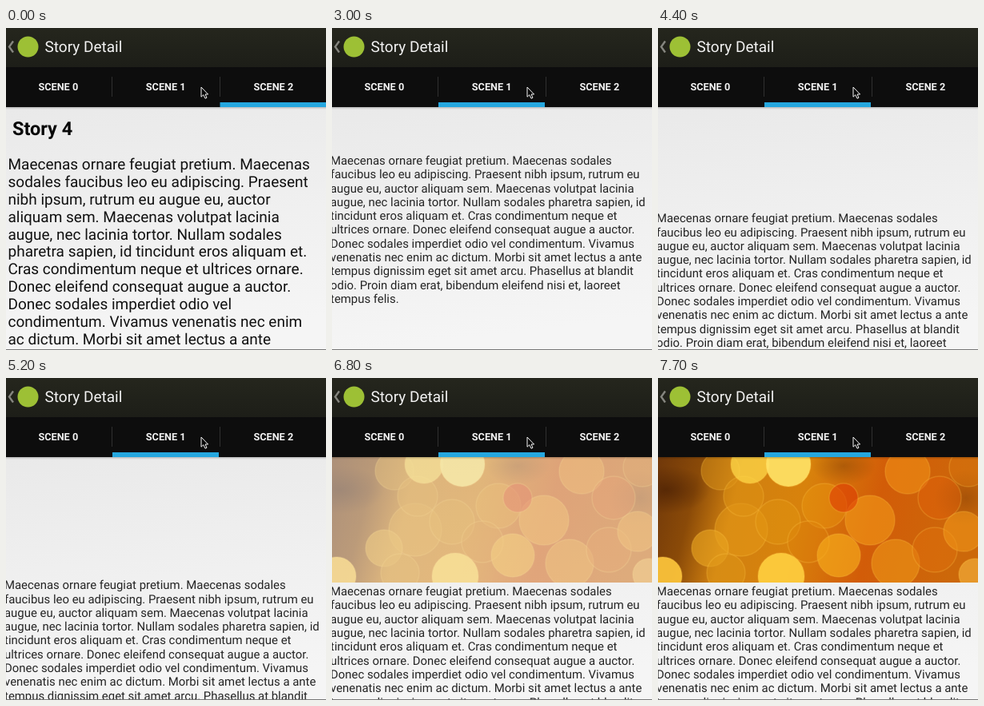
An HTML page that plays this animation: 400 by 403 pixels, repeating every 9700 ms.

```html
<!DOCTYPE html>
<html lang="en">
<head>
<meta charset="utf-8">
<title>Story Detail</title>
<style>
html, body { margin: 0; width: 100%; height: 100%; overflow: hidden; background: #eee; }
svg { display: block; width: 400px; height: 403px; font-family: Roboto, "Noto Sans", sans-serif; }
text { text-rendering: geometricPrecision; white-space: pre; }
.tab { font-size: 12.7px; font-weight: 700; fill: #f2f2f2; text-anchor: middle; }
</style>
</head>
<body>
<svg viewBox="0 0 400 403">
  <defs>
    <linearGradient id="paper" x1="0" y1="0" x2=".12" y2="1">
      <stop offset="0" stop-color="#e2e2e2"/>
      <stop offset=".16" stop-color="#e8e8e8"/>
      <stop offset=".6" stop-color="#efefef"/>
      <stop offset="1" stop-color="#f5f5f5"/>
    </linearGradient>
    <linearGradient id="bar" x1="0" y1="0" x2="0" y2="1">
      <stop offset="0" stop-color="#25261d"/>
      <stop offset="1" stop-color="#1d1e18"/>
    </linearGradient>
    <linearGradient id="shade" x1="0" y1="0" x2="0" y2="1">
      <stop offset="0" stop-color="#000" stop-opacity=".2"/>
      <stop offset="1" stop-color="#000" stop-opacity="0"/>
    </linearGradient>
    <linearGradient id="amber" x1="0" y1="0" x2="1" y2=".1">
      <stop offset="0" stop-color="#70380a"/>
      <stop offset=".14" stop-color="#8a4a08"/>
      <stop offset=".27" stop-color="#d08010"/>
      <stop offset=".48" stop-color="#d8820c"/>
      <stop offset=".72" stop-color="#d25c08"/>
      <stop offset="1" stop-color="#cc680a"/>
    </linearGradient>
    <radialGradient id="dark">
      <stop offset="0" stop-color="#4a2004" stop-opacity=".7"/>
      <stop offset="1" stop-color="#4a2004" stop-opacity="0"/>
    </radialGradient>
    <clipPath id="frame"><rect y="98" width="400" height="158"/></clipPath>
  </defs>

  <rect width="400" height="403" fill="url(#paper)"/>
  <g id="photo" clip-path="url(#frame)">
    <rect y="98" width="400" height="158" fill="url(#amber)"/>
    <ellipse cx="10" cy="140" rx="55" ry="30" fill="url(#dark)"/>
    <ellipse cx="232" cy="110" rx="40" ry="24" fill="url(#dark)" opacity=".4"/>
    <ellipse cx="385" cy="150" rx="40" ry="35" fill="url(#dark)" opacity=".4"/>
  </g>

  <text id="heading" x="8" y="134" font-size="23.5" font-weight="700" fill="#080808">Story 4</text>
  <g id="large" font-size="19" fill="#111"></g>
  <g id="small" font-size="14.92" fill="#242424"></g>
  <rect y="402" width="400" height="1" fill="#777"/>

  <rect y="99" width="400" height="3" fill="url(#shade)"/>
  <rect width="400" height="49" fill="url(#bar)"/>
  <rect y="49" width="400" height="50" fill="#0d0d0d"/>
  <path d="M9 16.5 4 23.5 9 30.5" fill="none" stroke="#85857f" stroke-width="2.4"/>
  <circle cx="27.5" cy="23.5" r="13" fill="#9dc035"/>
  <text x="48.5" y="30" font-size="19" fill="#f2f2f2">Story Detail</text>
  <path d="M132.5 61V86M267.5 61V86" stroke="#303030"/>
  <text class="tab" x="65.3" y="78.3">SCENE 0</text>
  <text class="tab" x="199.7" y="78.3">SCENE 1</text>
  <text class="tab" x="334.3" y="78.3">SCENE 2</text>
  <rect id="marker" y="93" width="133" height="6" fill="#25a7df"/>
  <path d="M244 74V86.2L246.8 83.7 249 88.2 251 87.2 249 83H252.6Z" fill="#080808" stroke="#f4f4f4"/>
</svg>
<script>
const LOOP = 9700, STEP = 100, SWITCH = 1000;
const $ = id => document.getElementById(id);

function add(parent, tag, attrs, text) {
  const el = document.createElementNS("http://www.w3.org/2000/svg", tag);
  for (const key in attrs) el.setAttribute(key, attrs[key]);
  if (text) el.textContent = text;
  parent.append(el);
}

function addLines(group, x, y, leading, lines) {
  lines.forEach((line, i) => add(group, "text", { x, y: y + i * leading }, line));
}

addLines($("large"), 2.5, 176.7, 21.95, [
  "Maecenas ornare feugiat pretium. Maecenas",
  "sodales faucibus leo eu adipiscing. Praesent",
  "nibh ipsum, rutrum eu augue eu, auctor",
  "aliquam sem. Maecenas volutpat lacinia",
  "augue, nec lacinia tortor. Nullam sodales",
  "pharetra sapien, id tincidunt eros aliquam et.",
  "Cras condimentum neque et ultrices ornare.",
  "Donec eleifend consequat augue a auctor.",
  "Donec sodales imperdiet odio vel",
  "condimentum. Vivamus venenatis nec enim",
  "ac dictum. Morbi sit amet lectus a ante"
]);
addLines($("small"), -2, 166, 17.32, [
  "Maecenas ornare feugiat pretium. Maecenas sodales",
  "faucibus leo eu adipiscing. Praesent nibh ipsum, rutrum eu",
  "augue eu, auctor aliquam sem. Maecenas volutpat lacinia",
  "augue, nec lacinia tortor. Nullam sodales pharetra sapien, id",
  "tincidunt eros aliquam et. Cras condimentum neque et",
  "ultrices ornare. Donec eleifend consequat augue a auctor.",
  "Donec sodales imperdiet odio vel condimentum. Vivamus",
  "venenatis nec enim ac dictum. Morbi sit amet lectus a ante",
  "tempus dignissim eget sit amet arcu. Phasellus at blandit",
  "odio. Proin diam erat, bibendum eleifend nisi et, laoreet",
  "tempus felis."
]);

// Bokeh lights: x, y, radius, colour, opacity
const lights = [
  [78, 116, 24, "#d89018", .55], [104, 190, 33, "#e89c18", .5],
  [107, 148, 25, "#e09414", .5], [65, 213, 23, "#e8a420", .65],
  [85, 244, 24, "#e09818", .5], [150, 180, 28, "#e09410", .45],
  [208, 160, 28, "#e8940e", .45], [188, 205, 26, "#dc800c", .4],
  [265, 178, 31, "#f49a18", .6], [312, 117, 28, "#ee8c14", .65],
  [352, 150, 27, "#e0600a", .5], [232, 150, 18, "#e03c04", .6],
  [226, 222, 27, "#f8ac1c", .65], [297, 232, 30, "#f09c18", .55],
  [346, 215, 28, "#e0700c", .5], [382, 192, 25, "#f09418", .6],
  [388, 112, 24, "#d8740e", .5], [396, 246, 20, "#f8b840", .6],
  [115, 108, 24, "#ffd848", .75], [163, 108, 28, "#ffe468", .9],
  [154, 248, 29, "#ffd040", .9], [6, 248, 24, "#ffc83c", .9]
];
for (const [cx, cy, r, color, alpha] of lights)
  add($("photo"), "circle", { cx, cy, r, fill: color, "fill-opacity": alpha,
    stroke: "#ffc648", "stroke-opacity": .25, "stroke-width": 1.5 });

const part = (t, from, length) => Math.min(1, Math.max(0, (t - from) / length));
const smooth = p => (1 - Math.cos(Math.PI * p)) / 2;

function bounce(p) {
  const x = p * 1.1226;
  const arc = (mid, base) => 8 * (x - mid) ** 2 + base;
  if (x < .3535) return arc(0, 0);
  if (x < .7408) return arc(.54719, .7);
  if (x < .9644) return arc(.8526, .9);
  return arc(1.0435, .95);
}

function draw(time) {
  const t = Math.floor(time / STEP) * STEP;
  const open = t >= SWITCH;
  $("marker").setAttribute("x", open ? 133 : 267.5);
  $("large").style.display = open ? "none" : "";
  $("small").style.display = open ? "" : "none";
  $("small").setAttribute("transform", `translate(0 ${106 * bounce(part(t, 2800, 2960))})`);
  $("heading").style.opacity = open ? 1 - smooth(part(t, 800, 1800)) : 1;
  $("photo").style.opacity = smooth(part(t, 5900, 1800));
}

const start = performance.now();
function tick() {
  draw((performance.now() - start) % LOOP);
  requestAnimationFrame(tick);
}
tick();
</script>
</body>
</html>
```
